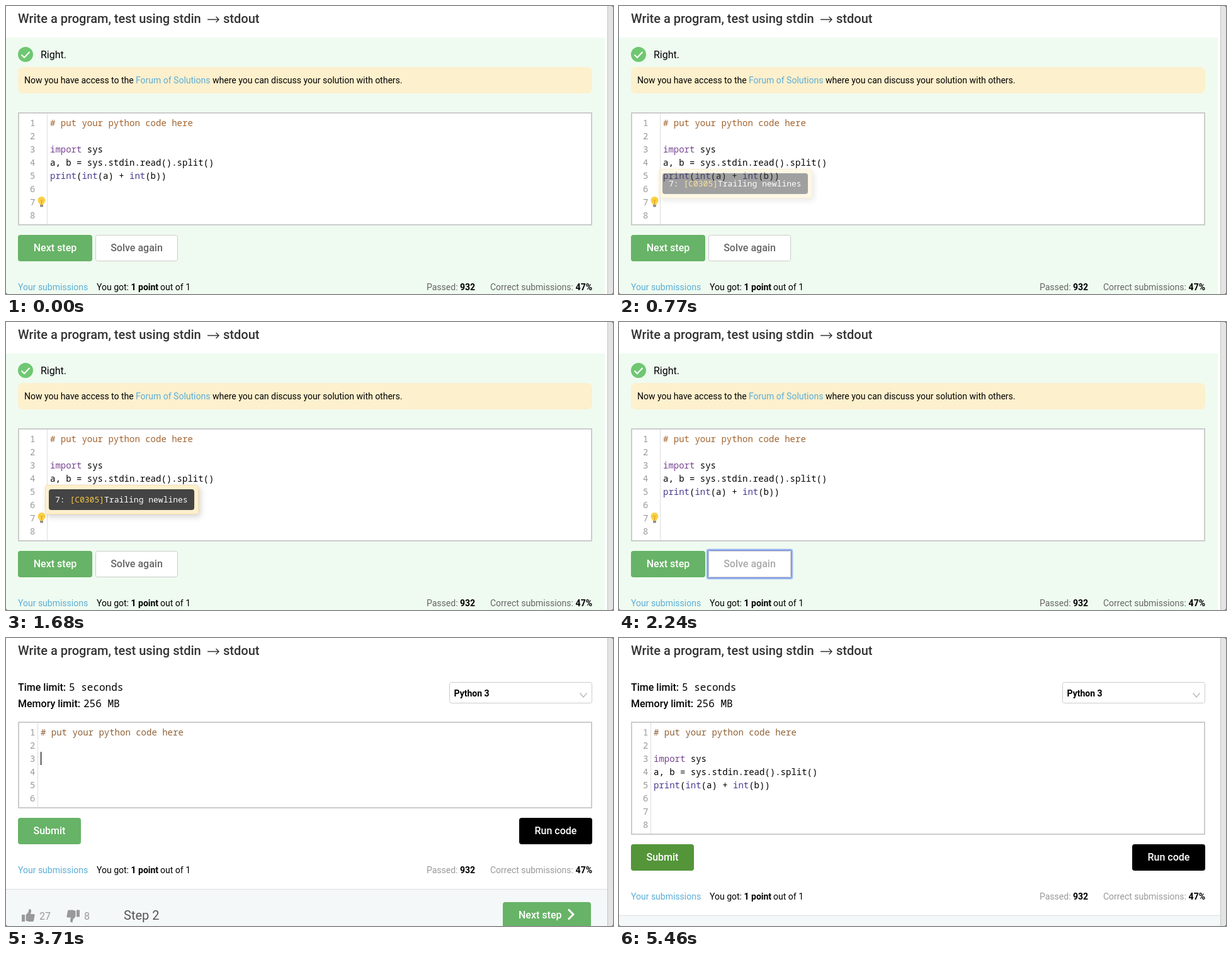
Animation of 964 by 458 pixels, one loop 5.53 s. Source, as an HTML page:

```html
<!DOCTYPE html>
<html lang="en">
<head>
<meta charset="utf-8">
<title>Code exercise</title>
<style>
  html, body { margin: 0; width: 100%; height: 100%; overflow: hidden; background: #fff; }
  svg { display: block; width: 964px; height: 458px; font-family: Roboto, sans-serif; }
  .mono { font-family: "Roboto Mono", "Noto Sans Mono", monospace; }
  .m { font-weight: 500; }
  .b { font-weight: 700; }
  #tip { filter: drop-shadow(3px 4px 5px rgba(0, 0, 0, .17)); }
</style>
</head>
<body>
<svg id="stage" viewBox="0 0 964 458"></svg>
<script>
const LOOP = 5530;
const GREEN = '#67b367', LINK = '#5badd8', GREY = '#999';

const text = (x, y, s, { size = 14, fill = '#000', cls = '', anchor = 'start', id = '' } = {}) =>
  `<text x="${x}" y="${y}" font-size="${size}" fill="${fill}" class="${cls}" text-anchor="${anchor}" id="${id}">${s}</text>`;

const rect = (x, y, w, h, fill, extra = '') =>
  `<rect x="${x}" y="${y}" width="${w}" height="${h}" fill="${fill}" ${extra}/>`;

const line = (d, stroke, width = 1, extra = '') =>
  `<path d="${d}" fill="none" stroke="${stroke}" stroke-width="${width}" ${extra}/>`;

const span = (fill, s) => `<tspan fill="${fill}">${s}</tspan>`;

const button = (x, y, w, label, fill, id = '') =>
  rect(x, y, w, 42, fill, `rx="4" id="${id}"`) +
  text(x + w / 2, y + 26, label, { size: 16, fill: '#fff', cls: 'm', anchor: 'middle' });

// Editor frame, gutter with line numbers, and the opening comment
function editor(y, rows, gutter, comment) {
  let s = rect(20, y, 910, rows * 21 + 10, '#fff', 'stroke="#ccc" stroke-width="2"') +
    line(`M${gutter + .5} ${y + 1}v${rows * 21 + 8}`, '#ddd');
  for (let i = 0; i < rows; i++)
    s += text(46.5, y + 21 + i * 21, i + 1, { fill: GREY, cls: 'mono', anchor: 'end' });
  return s + text(gutter + 5, y + 21, '# put your python code here', { fill: comment, cls: 'mono' });
}

function solution(x, y) {
  const kw = '#774390', fn = '#4b3a91';
  return [
    span(kw, 'import') + ' sys',
    'a, b = sys.stdin.read().split()',
    span(fn, 'print') + '(' + span(fn, 'int') + '(a) + ' + span(fn, 'int') + '(b))'
  ].map((s, i) => text(x, y + i * 21, s, { cls: 'mono' })).join('');
}

const stats = (y, grey) =>
  text(19, y, 'Your submissions', { fill: LINK }) +
  text(144, y, 'You got:') +
  text(198.5, y, '1 point', { cls: 'b' }) +
  text(293, y, 'out of 1', { anchor: 'end' }) +
  text(668, y, 'Passed:', { fill: grey }) +
  text(745, y, '932', { cls: 'b', anchor: 'end' }) +
  text(769, y, 'Correct submissions:', { fill: grey }) +
  text(931, y, '47%', { cls: 'b', anchor: 'end' });

const header =
  text(19, 27, 'Write a program, test using stdin', { size: 20, fill: '#333', cls: 'm' }) +
  line('M320 21.5h18M333.5 17l4.5 4.5l-4.5 4.5', '#333', 1.4) +
  text(345, 27, 'stdout', { size: 20, fill: '#333', cls: 'm' });

const scrollbar =
  rect(955, 0, 9, 458, '#e4e4e4') + line('M955.5 0v458', '#c4c4c4') +
  '<path d="M0 458v-3q0 3 3 3zM964 458v-3q0 3-3 3zM964 0v3q0-3-3-3z" fill="#555"/>';

const bulb =
  '<path d="M53.5 316q0-2-1.7-3.3a6 6 0 1 1 9.4 0q-1.7 1.3-1.7 3.3z" fill="#fbd043"/>' +
  line('M54.5 308l2 2l2-2M56.5 310v5', '#d79a25') +
  rect(54, 316, 5, 3.5, '#8d8d8d', 'rx="1"');

const tip = '<g id="tip">' +
  rect(62.5, 259.5, 243, 46, '#fdf0cd', 'rx="3" stroke="#f6dfa9"') +
  rect(68, 266, 231, 33, '#444', 'rx="4"') +
  text(78, 287, '7: ' + span('#f6c840', '[C0305]') + 'Trailing newlines',
    { size: 13, fill: '#fff', cls: 'mono m' }) + '</g>';

const solved = '<g id="solved">' +
  rect(0, 50, 951, 408, '#effbf0') +
  '<circle cx="31" cy="77" r="12" fill="#6fc772"/>' +
  line('M24.5 77.5l4.5 4.5l8.5-9', '#fff', 2) +
  text(55, 83, 'Right.', { size: 16 }) +
  rect(19, 97, 912, 42, '#fdf0cd', 'rx="8"') +
  text(29, 123, 'Now you have access to the') +
  text(206, 123, 'Forum of Solutions', { fill: LINK }) +
  text(328, 123, 'where you can discuss your solution with others.') +
  editor(170, 8, 65, '#a2632f') + solution(70, 233) + bulb +
  button(19, 364, 118, 'Next step', GREEN) +
  rect(142.5, 364.5, 130, 41, '#fff', 'rx="3" stroke="#ccc"') +
  text(207.5, 390, 'Solve again', { size: 16, fill: '#666', cls: 'm', anchor: 'middle', id: 'again' }) +
  '<g id="ring">' +
  rect(139.5, 361.5, 136, 47, 'none', 'rx="3" stroke="#b4c6f3" stroke-width="2"') +
  rect(141, 363, 133, 44, 'none', 'rx="2" stroke="#7f9ce6" stroke-width="2"') + '</g>' +
  stats(452, '#666') + tip + '</g>';

const thumb = 'M0 9h5v11h-5zM6.5 9.5l4-4.5l1-5q4 0 3.5 4l-1 4h5q2 0 1.5 2.5l-1.500 8q-.5 1.500-2 1.500h-6l-4.500-1.500z';

const lower = '<g id="lower">' +
  button(19, 286, 100, 'Submit', GREEN, 'submit') +
  button(815, 286, 116, 'Run code', '#000') +
  stats(374, GREY) +
  rect(0, 400, 955, 60, '#f4f8f9') + line('M0 399.5h955', '#dcdfe0') +
  `<path d="${thumb}" transform="translate(25 431)" fill="${GREY}"/>` +
  text(53, 448, '27', { size: 16, fill: GREY }) +
  `<path d="${thumb}" transform="translate(117 452.500) rotate(180)" fill="${GREY}"/>` +
  text(124, 448, '8', { size: 16, fill: GREY }) +
  text(187, 448, 'Step 2', { size: 20, fill: '#555' }) +
  rect(789, 420, 140, 42, GREEN, 'rx="4"') +
  text(814, 446, 'Next step', { size: 16, fill: '#fff', cls: 'm' }) +
  line('M893 431.5l8 8l-8 8', '#fff', 3) + '</g>';

const fresh = '<g id="fresh">' +
  text(19, 84, 'Time limit:', { size: 16, cls: 'm' }) +
  text(100, 84, '5 seconds', { size: 16, cls: 'mono' }) +
  text(19, 110, 'Memory limit:', { size: 16, cls: 'm' }) +
  text(123, 110, '256 MB', { size: 16, cls: 'mono' }) +
  rect(704.5, 70.5, 226, 33, '#fff', 'rx="3" stroke="#ccc"') +
  text(711.5, 93, 'Python 3', { cls: 'b' }) +
  line('M911.5 87.5l5.5 6.500l5.5-6.500', '#bbb', 1.5) +
  '<g id="blank">' + editor(134, 6, 50, '#8f6237') + '</g>' +
  '<g id="filled">' + editor(134, 8, 50, '#8f6237') + solution(55, 197) + '</g>' +
  lower + rect(55, 181, 1.2, 21, '#000', 'id="caret"') + '</g>';

document.getElementById('stage').innerHTML =
  rect(0, 0, 964, 458, '#fff') + header + solved + fresh + scrollbar;

const $ = id => document.getElementById(id);
const show = (id, on) => $(id).setAttribute('display', on ? 'inline' : 'none');
const ramp = (t, a, b) => Math.min(1, Math.max(0, (t - a) / (b - a)));
const mix = (a, b, p) => `rgb(${a.map((v, i) => Math.round(v + (b[i] - v) * p))})`;

const RESET = 2380, PASTE = 4330;

function draw(t) {
  const isFresh = t >= RESET, pasted = t >= PASTE;
  show('solved', !isFresh);
  show('fresh', isFresh);

  const p = ramp(t, 630, 910) * (1 - ramp(t, 1680, 1890));
  show('tip', p > 0);
  $('tip').setAttribute('opacity', p);
  $('tip').setAttribute('transform', `translate(${2 * (1 - p)} 0)`);

  show('ring', t >= 2100);
  $('again').setAttribute('fill', t >= 2170 ? '#aaa' : '#666');

  show('blank', !pasted);
  show('filled', pasted);
  $('lower').setAttribute('transform', `translate(0 ${pasted ? 42 : 0})`);
  show('caret', (t >= 3710 && t < 4200) || (pasted && t < PASTE + 500));
  $('caret').setAttribute('transform', pasted ? 'translate(185 42)' : '');
  $('submit').setAttribute('fill', mix([103, 179, 103], [84, 149, 58], ramp(t, 5000, 5280)));
}

const start = performance.now();
function tick() {
  draw((performance.now() - start) % LOOP);
  requestAnimationFrame(tick);
}
tick();
</script>
</body>
</html>
```
